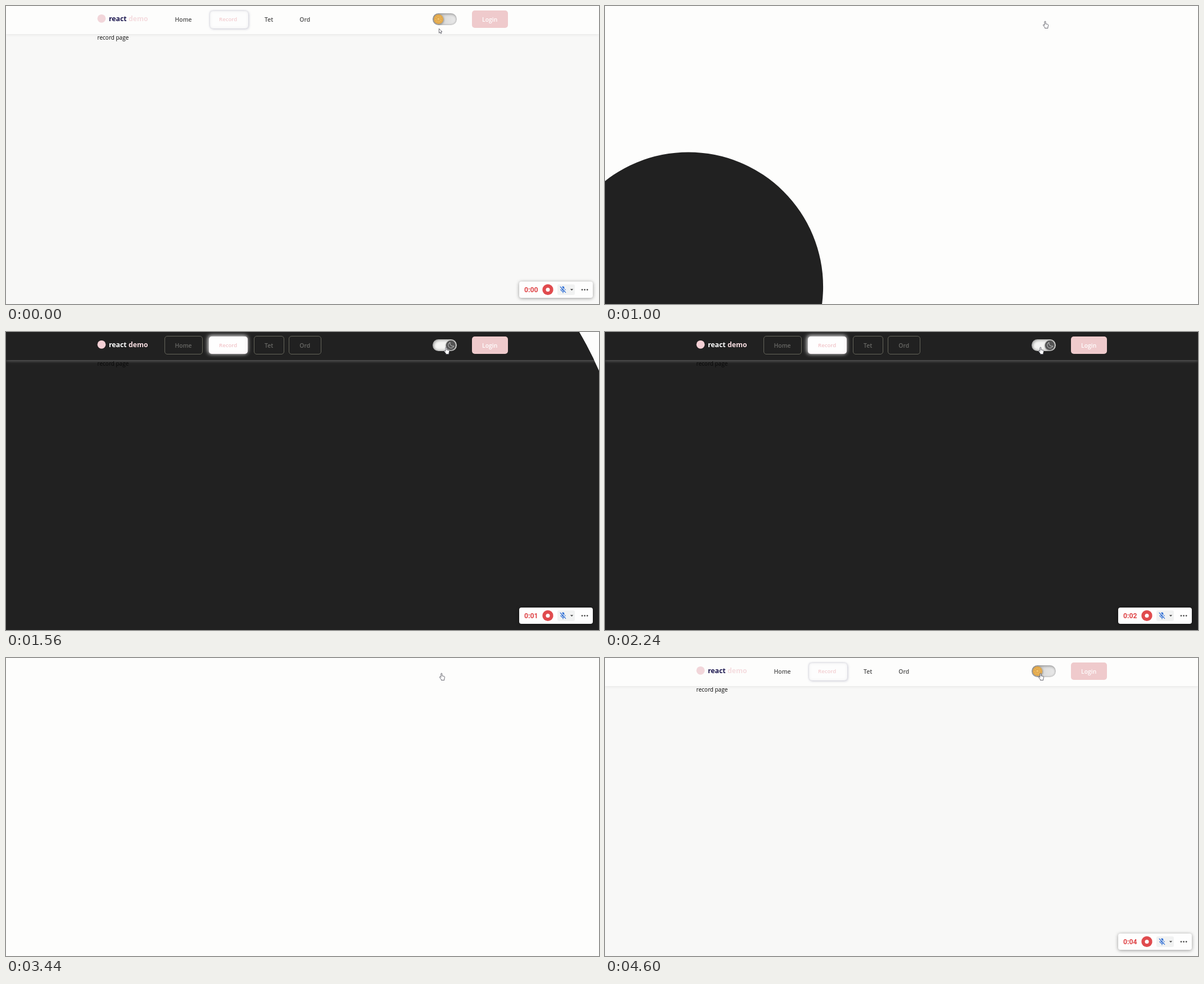
An HTML page for the animation above (4.64 s loop, 1055 by 531 pixels).

```html
<!DOCTYPE html>
<html lang="en">
<head>
<meta charset="utf-8">
<title>Theme toggle</title>
<style>
  html, body { margin: 0; width: 100%; height: 100%; overflow: hidden; background: #fdfdfc; }
  #stage { position: fixed; inset: 0; overflow: hidden; }
  .page, .page svg, #cursor { position: absolute; left: 0; top: 0; width: 1055px; height: 582px; }
  .page div { position: absolute; box-sizing: border-box; }
  text { font: 600 10.4px "Open Sans", "Noto Sans", sans-serif; }

  .light { background: #f8f8f7; --nav: #4e4e4e; --pink: #f3cdd0; --react: #1d1850; --demo: #f5dcdf; --mark: #f2d6da; }
  .dark { background: #212121; --nav: #696966; --pink: #f1c5c9; --react: #fff; --demo: #f8dfe2; --mark: #f4d0d5; }

  .bar { background: #fdfdfc; box-shadow: 0 1px 6px rgba(0, 0, 0, .08); }
  .dark .bar { background: #212121; box-shadow: 0 2px 5px rgba(255, 255, 255, .26); }
  .tab { border-radius: 5px; }
  .dark .tab { border: 1px solid #66665b; }
  .active { border-radius: 5px; }
  .light .active { background: #fdfdfd; box-shadow: 1px 1px 4px rgba(70, 70, 110, .28), -1px -1px 3px rgba(90, 90, 130, .14), inset 0 0 5px rgba(120, 120, 140, .12); }
  .dark .active { background: #fefefe; box-shadow: -1px -1px 7px 1px rgba(255, 255, 255, .85), inset -2px -2px 5px rgba(240, 205, 220, .25); }
  .track { border-radius: 11px; }
  .light .track { background: linear-gradient(90deg, #b9b9b9, #dedede 55%, #e9e9e9); box-shadow: inset 1px 2px 4px rgba(0, 0, 0, .3), inset -1px -1px 3px rgba(0, 0, 0, .12); }
  .dark .track { background: #f4f4f2; box-shadow: inset 2px 2px 4px rgba(0, 0, 0, .3), inset -1px -2px 4px rgba(0, 0, 0, .22); }
  .knob { border-radius: 50%; }
  .light .knob { background: radial-gradient(circle, #f0bf68 25%, #dd9f3d 75%); box-shadow: 1px 1px 3px rgba(0, 0, 0, .35); }
  .dark .knob { background: #535353; box-shadow: -1px 1px 2px rgba(0, 0, 0, .4); }
  .login { border-radius: 5px; background: #efcacc; }
  .recorder { border-radius: 4px; background: #fefefe; box-shadow: 0 1px 6px rgba(0, 0, 0, .4); }
  .mic { border-radius: 3px; background: #f1f2f2; }
  .clock { font: 700 12.2px Roboto, Inter, sans-serif; fill: #df4447; }
</style>
</head>
<body>
<div id="stage"></div>
<script>
const LOOP = 4640, SPREAD = 1800;
const TO_DARK = 652, TO_LIGHT = 3348;

const box = (cls, x, y, w, h) =>
  `<div class="${cls}" style="left:${x}px;top:${y}px;width:${w}px;height:${h}px"></div>`;
const label = (x, y, str, fill, style = '') =>
  `<text x="${x}" y="${y}" fill="${fill}" style="${style}">${str}</text>`;
const dot = (x, y, r, fill) => `<circle cx="${x}" cy="${y}" r="${r}" fill="${fill}"/>`;

const sun = `<g fill="none" stroke="#c98a2c" stroke-width=".8">
  <circle cx="769.3" cy="23.2" r="3"/>
  <circle cx="769.3" cy="23.2" r="5.2" stroke-dasharray="1.4 2.68"/></g>`;
const moon = `<path d="M790 18.5a5.2 5.2 0 1 0 6.8 6.6a5.4 5.4 0 0 1-6.8-6.6Z"
  fill="none" stroke="#d2d2d2" stroke-width=".9"/>`;
const micIcon = `<g fill="none" stroke="#2f6fd6" stroke-width="1.2">
  <rect x="989.3" y="500" width="3.4" height="6.4" rx="1.7" fill="#2f6fd6"/>
  <path d="M986.9 504.5a4.1 4.1 0 0 0 8.2 0M991 508.8V511.4"/>
  <path d="M987 499.6L997 510" stroke="#f1f2f2" stroke-width="1.4"/>
  <path d="M985.8 500L996 510.8"/></g>`;

function page(theme, knobX, icon) {
  const boxes =
    box('bar', 0, 0, 1055, 49.5) +
    box('tab', 281.5, 6.5, 68, 33.5) +
    (theme === 'light' ? box('active', 363, 9, 67.5, 30.5) : box('active', 361, 7.5, 69, 31.5)) +
    box('tab', 440.5, 6.5, 54, 33.5) +
    box('tab', 503, 6.5, 58, 33.5) +
    box('track', 758.5, 13, 43, 21) +
    box('knob', knobX - 8.3, 15, 16.6, 16.6) +
    box('login', 829, 8, 63.5, 31) +
    box('recorder', 912.5, 490.5, 131.5, 29.5) +
    box('mic', 980.5, 496, 31.5, 19);
  const drawing =
    dot(170, 22.3, 7.4, 'var(--mark)') +
    label(183, 26.8, 'react <tspan fill="var(--demo)">demo</tspan>', 'var(--react)', 'font-size:12.3px;font-weight:700') +
    label(300.5, 27.5, 'Home', 'var(--nav)') +
    label(379, 27.3, 'Record', 'var(--pink)', 'font-size:9.6px') +
    label(460, 27.5, 'Tet', 'var(--nav)') +
    label(522.3, 27.5, 'Ord', 'var(--nav)') +
    label(847, 27.5, 'Login', '#fff') +
    label(162.6, 60, 'record page', '#080808', 'font-size:10px;font-weight:400') +
    icon +
    '<text class="clock" x="922" y="509.7"></text>' +
    dot(964, 505.4, 9.6, '#e04b4e') + dot(964, 505.4, 3.5, '#fff') +
    micIcon +
    '<path d="M1003.8 504.2h5.4l-2.7 2.9Z" fill="#444"/>' +
    [1025, 1029.6, 1034.2].map(x => dot(x, 505.6, 1.35, '#444')).join('');
  return `<div class="page ${theme}">${boxes}<svg>${drawing}</svg></div>`;
}

const stage = document.getElementById('stage');
stage.innerHTML = page('light', 769.3, sun) + page('dark', 791.7, moon) +
  `<svg id="cursor"><g stroke-linejoin="round" fill="#fff" stroke="#45454f" stroke-width=".8">
    <path id="arrow" d="M.4 .4V8.2L2.2 6.6 3.5 9.3 4.8 8.7 3.5 6H6Z"/>
    <path id="hand" d="M0 1.3C0-.2 2-.2 2 1.3V4.8L5.6 5.6Q6.9 6 6.7 7.6L5.9 10.8V12.6H.6V11.2L-2.4 7.6Q-2.7 6-1.3 6.3L0 7.5Z"/>
  </g></svg>`;

const light = stage.querySelector('.light'), dark = stage.querySelector('.dark');
const clocks = stage.querySelectorAll('.clock');
const arrow = document.getElementById('arrow'), hand = document.getElementById('hand');

// The CSS "ease" curve, solved by bisection.
function ease(t) {
  if (t <= 0) return 0;
  if (t >= 1) return 1;
  let lo = 0, hi = 1, s = .5;
  for (let i = 0; i < 24; i++) {
    s = (lo + hi) / 2;
    if (.75 * s * (1 - s) + s ** 3 < t) lo = s; else hi = s;
  }
  return .3 * s * (1 - s) ** 2 + 3 * s * s * (1 - s) + s ** 3;
}

// The circle grows from the lower left corner to the middle of the viewport.
const reveal = p => p >= 1 ? 'none' : `circle(${p * 100}% at ${p * 50}% ${100 - p * 50}%)`;

// time, x, y of the pointer's tip
const PATH = [[0, 770, 40], [160, 770, 40], [520, 782, 27], [1800, 782, 27], [2040, 773.8, 27], [LOOP, 773.8, 27]];
function pointer(t) {
  const i = PATH.findIndex(k => k[0] > t);
  const [t0, x0, y0] = PATH[i - 1], [t1, x1, y1] = PATH[i];
  const k = (t - t0) / (t1 - t0);
  return [x0 + (x1 - x0) * k, y0 + (y1 - y0) * k];
}

function draw(t) {
  const toLight = t >= TO_LIGHT, toDark = t >= TO_DARK && !toLight;
  dark.style.display = toDark ? '' : 'none';
  light.style.display = toDark ? 'none' : '';
  dark.style.clipPath = reveal(ease((t - TO_DARK) / SPREAD));
  light.style.clipPath = toLight ? reveal(ease((t - TO_LIGHT) / SPREAD)) : 'none';

  const time = '0:0' + Math.floor((t + 200) / 1000);
  clocks.forEach(c => { c.textContent = time; });

  const [x, y] = pointer(t), over = y < 34;
  arrow.style.display = over ? 'none' : '';
  hand.style.display = over ? '' : 'none';
  (over ? hand : arrow).setAttribute('transform', `translate(${x} ${y})`);
}

const start = performance.now();
function tick() {
  draw((performance.now() - start) % LOOP);
  requestAnimationFrame(tick);
}
tick();
</script>
</body>
</html>
```
